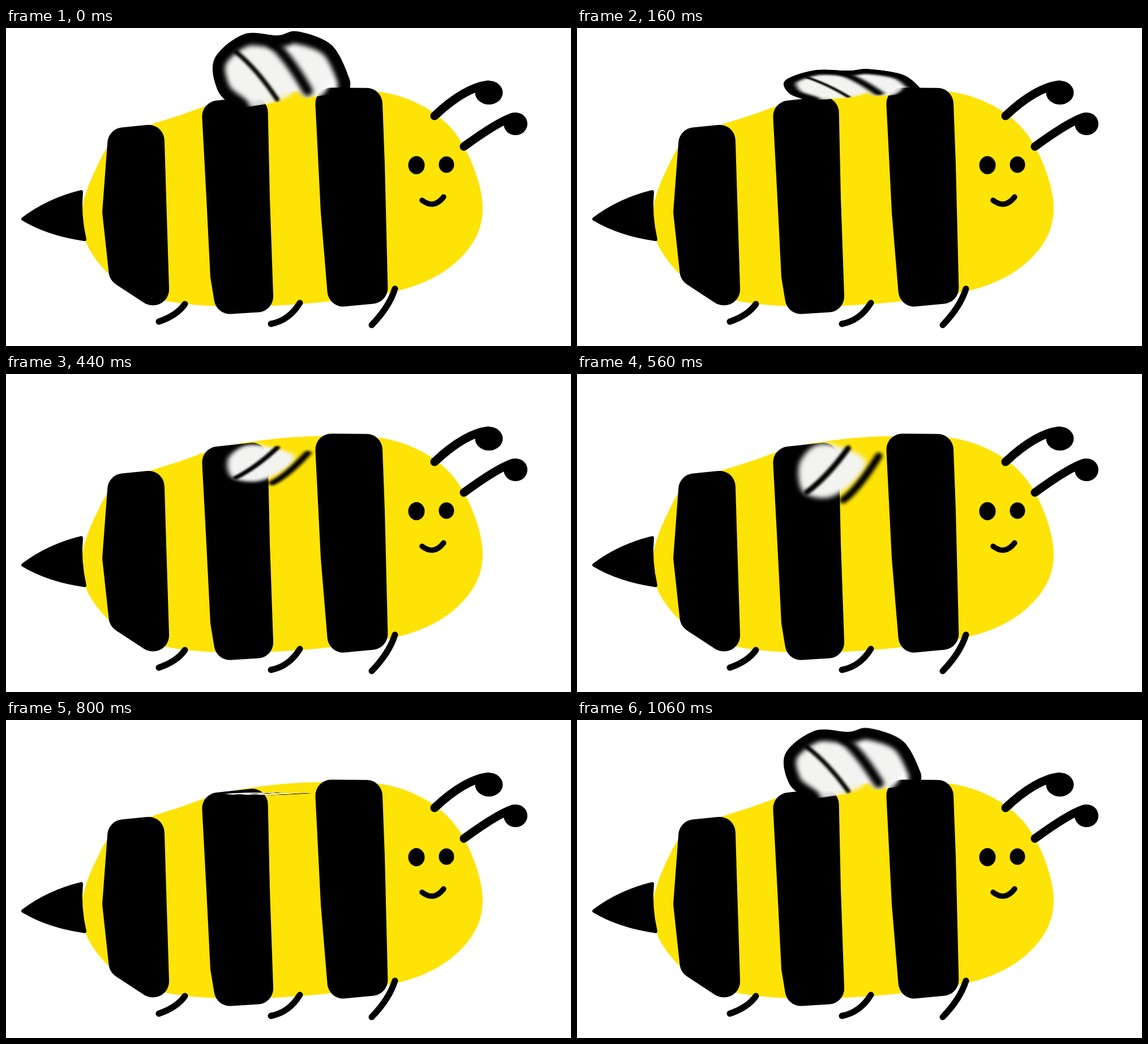
An HTML page with a canvas that plays this animation: 998 px wide and 561 px high, repeating every 1.08 s.

```html
<!DOCTYPE html>
<html lang="en">
<head>
<meta charset="utf-8">
<title>Bee</title>
<style>
  html, body { margin: 0; width: 100%; height: 100%; overflow: hidden; background: #fff; }
  canvas { display: block; }
</style>
</head>
<body>
<canvas id="stage" width="998" height="561"></canvas>
<script>
const W = 998, H = 561, LOOP = 1080, STEP = 20;
const YELLOW = '#fee306', BLACK = '#000', PANE = '#f3f3f2';
const ctx = document.getElementById('stage').getContext('2d');

// Smooth curve through a few key points (x, y pairs).
function curve(pts, closed) {
  const n = pts.length / 2, path = new Path2D();
  const at = i => {
    const k = closed ? (i + n) % n : Math.max(0, Math.min(n - 1, i));
    return [pts[2 * k], pts[2 * k + 1]];
  };
  path.moveTo(...at(0));
  for (let i = 0; i < (closed ? n : n - 1); i++) {
    const a = at(i - 1), b = at(i), c = at(i + 1), d = at(i + 2);
    path.bezierCurveTo(
      b[0] + (c[0] - a[0]) / 6, b[1] + (c[1] - a[1]) / 6,
      c[0] - (d[0] - b[0]) / 6, c[1] - (d[1] - b[1]) / 6,
      c[0], c[1]);
  }
  if (closed) path.closePath();
  return path;
}

// Polygon with rounded corners.
function rounded(pts, r) {
  const n = pts.length, path = new Path2D();
  const [first, last] = [pts[0], pts[n - 1]];
  path.moveTo((first[0] + last[0]) / 2, (first[1] + last[1]) / 2);
  pts.forEach((p, i) => path.arcTo(...p, ...pts[(i + 1) % n], r));
  path.closePath();
  return path;
}

function oval(x, y, rx, ry) {
  const path = new Path2D();
  path.ellipse(x, y, rx, ry, 0, 0, Math.PI * 2);
  return path;
}

function fill(g, path, color = BLACK) {
  g.fillStyle = color;
  g.fill(path);
}

function stroke(g, path, width) {
  g.lineWidth = width;
  g.lineCap = g.lineJoin = 'round';
  g.strokeStyle = BLACK;
  g.stroke(path);
}

const body = curve([
  134, 325, 160, 246, 200, 193, 310, 153, 400, 125, 540, 110, 687, 118,
  790, 181, 841, 302, 815, 392, 715, 457, 520, 487, 330, 488, 215, 458, 150, 395], true);

const stripes = [
  [[181, 178], [279, 168], [283, 300], [289, 490], [250, 489], [183, 445], [170, 325]],
  [[345, 131], [462, 118], [466, 300], [473, 500], [372, 506], [361, 440], [354, 300]],
  [[545, 105], [664, 106], [669, 240], [675, 484], [570, 494], [556, 325]]
].map(p => rounded(p, 28));

const tail = new Path2D('M30 337 Q75 303 133 289 Q129 330 139 373 Q75 364 30 337 Z');
const feelers = new Path2D('M757 155 Q810 105 852 100 M809 209 Q868 166 895 157');
const legs = new Path2D('M316 487 Q302 507 270 518 M519 485 Q500 516 468 522 M687 460 Q677 492 646 524');
const smile = new Path2D('M735 304 Q756 320 773 298');
const dots = [
  oval(853, 114, 24.5, 21), oval(900, 169, 21, 20),
  oval(725, 242, 14.5, 16), oval(778, 241, 13.5, 14.5)
];

// Wing parts, drawn upright
const rim = curve([408, 142, 375, 112, 368, 55, 420, 11, 480, 13, 515, 6, 575, 30, 606, 88, 606, 112]);
const leftPane = curve([405, 38, 445, 32, 487, 60, 510, 101, 470, 127, 425, 133, 395, 102, 392, 64], true);
const rightPane = oval(540, 68, 32, 52);
const vein = new Path2D('M406 42 Q443 72 479 126');
const divider = new Path2D('M470 27 Q497 48 533 111');

function makeWing(paint) {
  const c = document.createElement('canvas');
  c.width = W;
  c.height = 200;
  paint(c.getContext('2d'));
  return c;
}

const raised = makeWing(g => {
  g.clip(rim);
  g.filter = 'blur(4px)';
  for (const pane of [leftPane, rightPane]) {
    fill(g, pane, PANE);
    g.strokeStyle = PANE;
    g.lineWidth = 10;
    g.stroke(pane);
  }
  stroke(g, rim, 44);
  stroke(g, divider, 18);
  g.filter = 'blur(2px)';
  stroke(g, vein, 8);
});

const lowered = makeWing(g => {
  g.filter = 'blur(5px)';
  fill(g, leftPane, PANE);
  g.filter = 'blur(3px)';
  stroke(g, divider, 13);
  g.filter = 'blur(2px)';
  stroke(g, vein, 10);
});

function drawBee() {
  fill(ctx, body, YELLOW);
  for (const s of [tail, ...stripes, ...dots]) fill(ctx, s);
  stroke(ctx, tail, 6);
  stroke(ctx, legs, 11);
  stroke(ctx, feelers, 15);
  stroke(ctx, smile, 9.5);
}

// The wing flips linearly from +1 to -1 and back about its root.
function drawWing(t) {
  const flap = Math.abs(1 - 2 * t / LOOP) * 2 - 1;
  const [wing, root] = flap > 0 ? [raised, 118] : [lowered, 128.5];
  ctx.save();
  ctx.translate(0, root);
  ctx.scale(1, flap);
  ctx.drawImage(wing, 0, -root);
  ctx.restore();
}

const start = performance.now();
function frame() {
  const ms = (performance.now() - start) % LOOP;
  ctx.fillStyle = '#fff';
  ctx.fillRect(0, 0, W, H);
  drawBee();
  drawWing(Math.floor(ms / STEP) * STEP);
  requestAnimationFrame(frame);
}
frame();
</script>
</body>
</html>
```
